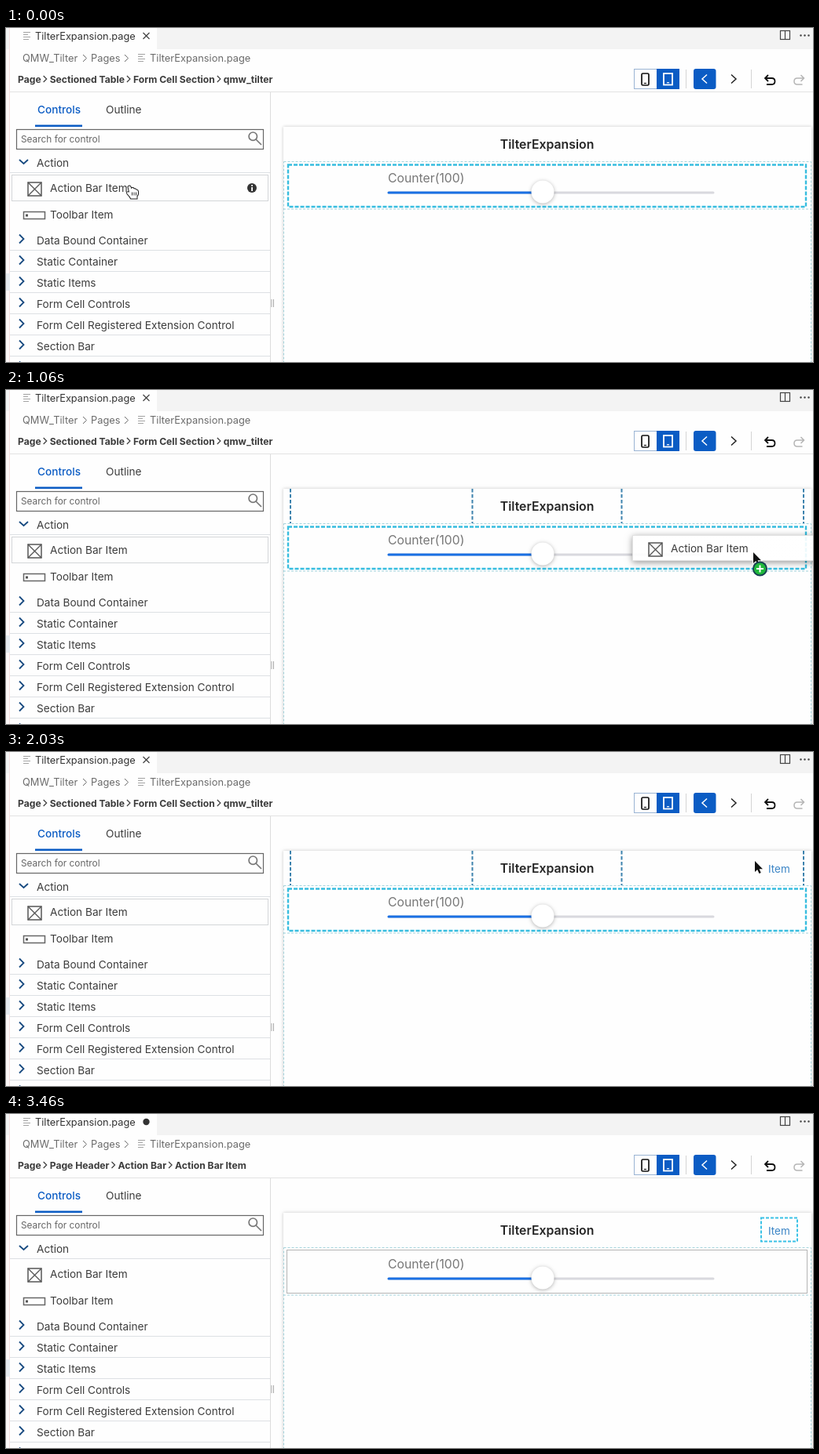
Animation, 1027 px wide and 426 px high, one loop 3860 ms. Source, as an HTML page with a canvas:

```html
<!DOCTYPE html>
<html lang="en">
<head>
<meta charset="utf-8">
<title>Page editor</title>
<style>
html, body { margin: 0; width: 100%; height: 100%; overflow: hidden; background: #fefefe; }
canvas { display: block; }
</style>
</head>
<body>
<canvas id="stage" width="1027" height="426"></canvas>
<script>
const c = document.getElementById('stage').getContext('2d');
const LOOP = 3860, BLUE = '#0b5cc4', INK = '#3c3c3c', GREY = '#6b6b6b', RULE = '#dde0e4';
const PAGE = 'TilterExpansion';

function text(s, x, y, size = 13.64, color = INK, weight = 400, align = 'left') {
  c.font = `${weight} ${size}px Inter, "Open Sans", sans-serif`;
  c.fillStyle = color;
  c.textAlign = align;
  c.fillText(s, x, y);
}
function fill(x, y, w, h, color) {
  c.fillStyle = color;
  c.fillRect(x, y, w, h);
}
function box(x, y, w, h, color, width = 1, dash = []) {
  c.setLineDash(dash);
  c.strokeStyle = color;
  c.lineWidth = width;
  c.strokeRect(x, y, w, h);
  c.setLineDash([]);
}
function line(points, color, width = 1, dash = []) {
  c.setLineDash(dash);
  c.strokeStyle = color;
  c.lineWidth = width;
  c.beginPath();
  for (let i = 0; i < points.length; i += 2) c.lineTo(points[i], points[i + 1]);
  c.stroke();
  c.setLineDash([]);
}
function disc(x, y, r, color) {
  c.fillStyle = color;
  c.beginPath();
  c.arc(x, y, r, 0, 7);
  c.fill();
}
function path(d, x, y, color, stroke, width = 1) {
  const p = new Path2D(d);
  c.save();
  c.translate(x, y);
  if (stroke) {
    c.strokeStyle = stroke;
    c.lineWidth = width;
    c.stroke(p);
  }
  if (color) {
    c.fillStyle = color;
    c.fill(p);
  }
  c.restore();
}
function shadow(color, blur, dy = 0) {
  c.shadowColor = color;
  c.shadowBlur = blur;
  c.shadowOffsetY = dy;
}
const noShadow = () => shadow('transparent', 0);
const chevron = (x, y, w, h, color, width) => line([x, y - h, x + w, y, x, y + h], color, width);

function listIcon(x, y) {
  [9, 6, 9, 7].forEach((w, i) => fill(x, y + i * 3, w, 1, '#a2a2a2'));
}

function crumbs(names) {
  let x = 15;
  names.forEach((name, i) => {
    text(name, x, 69.5, 12.15, INK, 700);
    x += c.measureText(name).width;
    if (i < names.length - 1) chevron(x + 3, 65, 4, 4, INK, 1.2);
    x += 11;
  });
}

function topBar(selected) {
  fill(0, 0, 1027, 27, '#f3f3f3');
  fill(5, 0, 187, 27, '#fefefe');
  listIcon(22, 5);
  text(PAGE + '.page', 37, 14.5, 12.8, '#333');
  if (selected) disc(178.5, 10, 4.2, '#333');
  else {
    line([174.5, 6, 182.5, 14], '#444', 1.2);
    line([182.5, 6, 174.5, 14], '#444', 1.2);
  }
  box(985.5, 3.5, 12, 11, '#444', 1.2);
  line([991.5, 3, 991.5, 15], '#444', 1.2);
  for (const x of [1011.5, 1016.5, 1021.5]) disc(x, 9.5, 1.2, '#444');

  text('QMW_Tilter', 21, 43, 12.85, GREY);
  chevron(98, 38.5, 4.5, 4.5, GREY);
  text('Pages', 108, 43, 12.85, GREY);
  chevron(151, 38.5, 4.5, 4.5, GREY);
  listIcon(168, 33);
  text(PAGE + '.page', 183, 43, 12.85, GREY);
  crumbs(selected
    ? ['Page', 'Page Header', 'Action Bar', 'Action Bar Item']
    : ['Page', 'Sectioned Table', 'Form Cell Section', 'qmw_tilter']);

  box(799.5, 52.5, 57, 25, '#9ab4d4');
  fill(828, 52, 29, 26, BLUE);
  path('M1.5 0h6q1.5 0 1.5 1.5v12q0 1.5-1.5 1.5h-6q-1.5 0-1.5-1.5v-12q0-1.5 1.5-1.5z', 809, 58, null, '#111', 1.7);
  line([812, 70.5, 815, 70.5], '#111', 1.2);
  box(837, 58, 11, 14.5, '#fff', 1.8);
  line([841, 69.7, 844, 69.7], '#fff', 1.2);
  line([865.5, 53, 865.5, 77], '#d4d4d4');
  c.fillStyle = BLUE;
  c.beginPath();
  c.roundRect(875, 52, 28.5, 26, 3);
  c.fill();
  chevron(892, 65, -6, 5.5, '#fff', 1.5);
  chevron(923, 65, 6, 5.5, '#222', 1.5);
  line([948.5, 53, 948.5, 77], '#d4d4d4');
  const arrow = 'M5 0L1 4L5 8M1 4H9.5Q13.5 4 13.5 8T9.5 12H3';
  path(arrow, 965, 60, null, '#111', 1.8);
  c.save();
  c.translate(2 * 1009.5, 0);
  c.scale(-1, 1);
  path(arrow, 1002.5, 60, null, '#b5b5b5', 1.5);
  c.restore();
  line([5, 81.5, 1027, 81.5], '#e2e2e2');
}

function crossIcon(x, y) {
  box(x, y, 17, 17, '#555', 1.5);
  line([x, y, x + 17, y + 17], '#555', 1.3);
  line([x + 17, y, x, y + 17], '#555', 1.3);
}

function sidebar(hover, framed) {
  fill(0, 27, 4, 399, '#fcf8f8');
  fill(4, 0, 1, 426, '#f5e1e1');
  fill(0, 313, 5, 22, '#e6eaef');
  line([336.5, 82, 336.5, 426], '#dcdcdc');
  line([338, 346, 338, 356], '#aaa');
  line([340.5, 346, 340.5, 356], '#aaa');

  text('Controls', 40, 109, 13.64, BLUE, 500);
  text('Outline', 127, 109);
  fill(37, 123.5, 60, 2.5, BLUE);
  box(13.5, 129.5, 314, 25, '#666', 1.2);
  text('Search for control', 19, 146, 11.85, '#666');
  path('M10.5 5.2a5.2 5.2 0 1 1-10.4 0a5.2 5.2 0 1 1 10.4 0M9 9l7 7', 309, 133, null, '#777', 1.7);

  line([17, 168, 22.5, 173, 28, 168], '#174a80', 1.8);
  text('Action', 39, 176.5);
  line([5, 184.5, 336, 184.5], RULE);
  if (framed) box(7.5, 187.5, 326, 33, '#d3d5d8');
  crossIcon(28, 197);
  text('Action Bar Item', 56, 209);
  if (hover) {
    disc(313, 204, 6, '#333');
    fill(312.2, 203, 1.8, 5, '#fff');
    fill(312.2, 200, 1.8, 1.8, '#fff');
  }
  box(22.5, 234.5, 27, 9, '#666', 1.5);
  fill(25, 237.5, 3, 3, '#555');
  text('Toolbar Item', 56, 243);

  ['Data Bound Container', 'Static Container', 'Static Items', 'Form Cell Controls',
    'Form Cell Registered Extension Control', 'Section Bar', ''].forEach((name, i) => {
    const y = 270 + 27 * i;
    chevron(17, y - 1, 5.5, 5.5, '#174a80', 1.8);
    text(name, 39, y + 5.5);
    line([5, y + 13.5, 336, y + 13.5], RULE);
  });
}

function preview(guides, selected, itemShown) {
  shadow('rgba(0,0,0,.22)', 4);
  fill(353, 126, 672, 310, '#fefefe');
  noShadow();
  text(PAGE, 688.5, 154, 15.8, '#252525', 600, 'center');
  box(353.5, 170.5, 671, 270, '#a4d3dc', 1, [3, 2]);
  line([353, 231, 1025, 231], '#a4d3dc', 1, [3, 2]);
  if (selected) box(357.5, 173.5, 662, 55, '#b4b4b4');
  else box(359, 174.5, 659, 53.5, '#37bddf', 2.4, [5, 2]);
  if (guides) {
    for (const x of [362, 593.5, 783.5, 1015]) line([x, 126, x, 170], '#3c82ad', 2, [4.5, 2.5]);
  }
  if (itemShown) text('Item', 970, 153.5, 13.5, '#3d86c6');
  if (selected) box(961, 132.5, 46, 30, '#3bc2e6', 2, [4, 2]);

  text('Counter(100)', 486, 196.5, 15.75, '#777');
  c.lineCap = 'round';
  line([487, 210, 900, 210], '#d9d9de', 3);
  line([487, 210, 683, 210], '#1a70e4', 3);
  c.lineCap = 'butt';
  shadow('rgba(0,0,0,.3)', 5, 1);
  disc(683, 209, 14.5, '#fff');
  noShadow();
}

function pointer(x, y) {
  path('M0 0V14L3.2 11L5.5 16L7.8 15L5.6 10.2H10Z', x, y, '#111', '#fff', 1.6);
}

function hand(x, y) {
  path('M2 2Q3.5 0 5 2L6 5Q6 3 8 3.5Q9 4 9.5 5Q11 4 12 6Q14 5.5 14.5 8Q15 12 13 14V17H5.5Q4 14 1 11Q-1 8 3.5 9Z',
    x, y, '#fff', '#222', 2);
  for (const dx of [7, 9.5, 12]) line([x + dx, y + 9, x + dx, y + 13], '#333');
}

function ghost(x, y, alpha) {
  c.globalAlpha = alpha;
  const g = c.createLinearGradient(x, 0, x + 326, 0);
  g.addColorStop(0, 'rgba(255,255,255,.93)');
  g.addColorStop(.8, 'rgba(255,255,255,.9)');
  g.addColorStop(1, 'rgba(255,255,255,.6)');
  // Shadow only outside the card, since the card is translucent.
  c.save();
  c.beginPath();
  c.rect(0, 0, 1027, 426);
  c.rect(x, y, 326, 33);
  c.clip('evenodd');
  shadow('rgba(0,0,0,.4)', 8, 2);
  fill(x, y, 326, 33, '#fff');
  c.restore();
  fill(x, y, 326, 33, g);
  box(x + .5, y + .5, 325, 32, 'rgba(150,150,150,.28)');
  crossIcon(x + 21, y + 10);
  text('Action Bar Item', x + 49, y + 21.5);
  c.globalAlpha = 1;
}

function badge(x, y) {
  disc(x, y, 9.5, '#174052');
  disc(x, y, 7.6, '#20b83c');
  line([x - 4.5, y, x + 4.5, y], '#fff', 2);
  line([x, y - 4.5, x, y + 4.5], '#fff', 2);
}

const mix = (a, b, p) => a + (b - a) * p;
// Progress in seven equal jumps; the first one lands at the start time.
const jumps = (t, from, to) => Math.min(7, Math.floor((t - from) / (to - from) * 6 + 1.0001)) / 7;

function dragPlace(t) {
  if (t < 930) {
    const p = 1 - (1 - jumps(t, 360, 860)) ** 1.7;
    return [mix(7, 660, p), mix(187, 190, p)];
  }
  if (t < 1060) return [745, 212];
  if (t < 1230) return [797, 185];
  const p = jumps(t, 1230, 1660);
  return [mix(797, 800, p), mix(185, 124, p)];
}

function draw(t) {
  const dragging = t >= 360 && t < 2030;
  const selected = t >= 2430;
  fill(0, 0, 1027, 426, '#fefefe');
  topBar(selected);
  sidebar(t < 360, !selected);
  preview(t >= 360 && !selected, selected, t >= 1590);

  if (t < 360) hand(153.5, 200.5);
  else if (dragging) {
    const [x, y] = dragPlace(t);
    ghost(x, y, t < 1930 ? 1 : .45);
    pointer(x + 154, y + 22);
    if (t < 1930) badge(x + 162.5, y + 43);
  } else if (t < 3000) pointer(953, 139);
  else if (t < 3460) {
    const p = (jumps(t, 3000, 3460) - 1 / 7) * 7 / 6;
    pointer(mix(897, 550, p), mix(183, 440, p));
  }
}

function tick() {
  draw(performance.now() % LOOP);
  requestAnimationFrame(tick);
}
tick();
</script>
</body>
</html>
```
